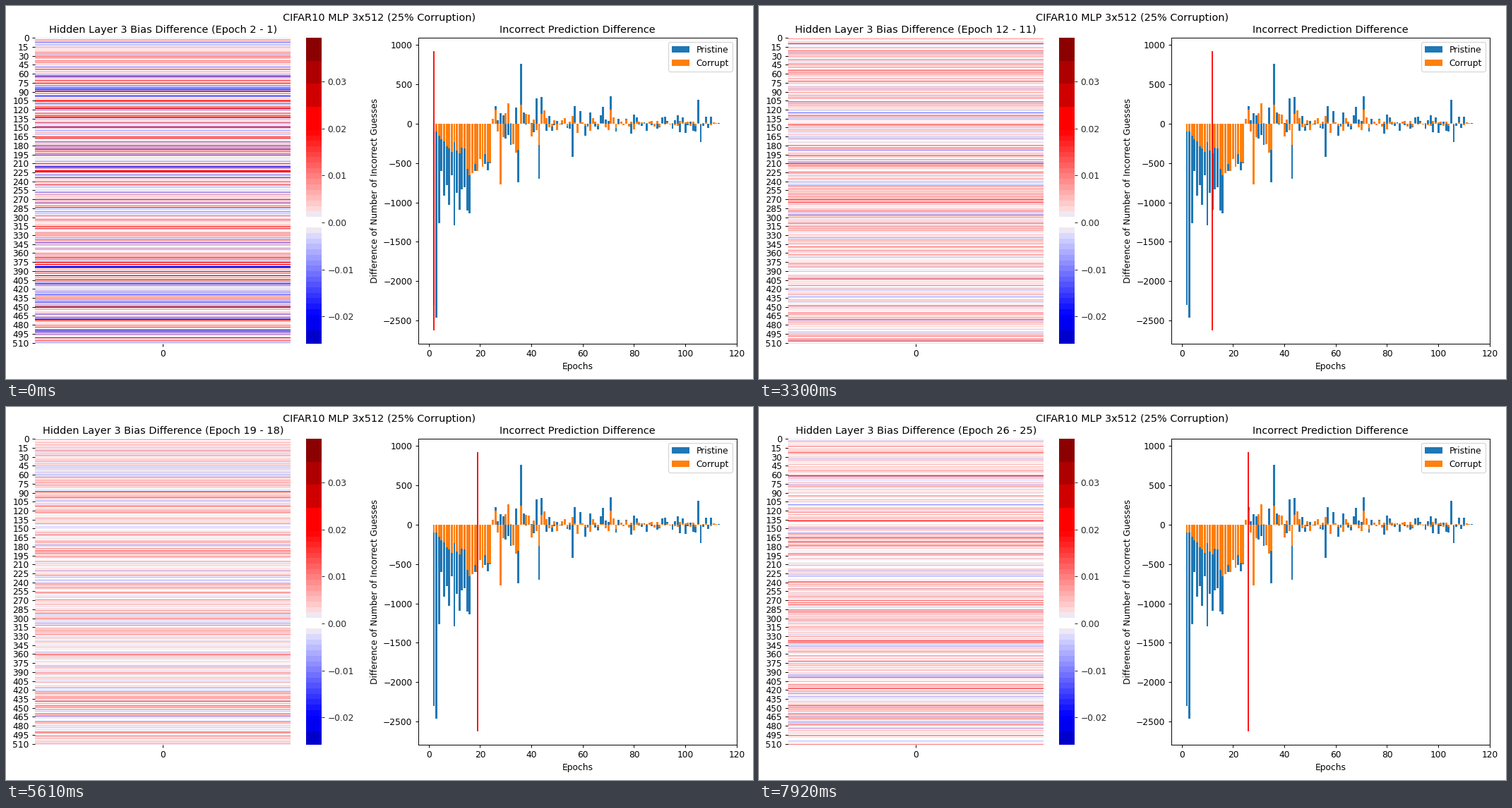
These frames come from a looping animation (1058x529 px, 8000 ms). A matplotlib script:

```python
import numpy as np
import matplotlib.pyplot as plt
from matplotlib.animation import FuncAnimation
from matplotlib.patches import Patch, PathPatch
from matplotlib.path import Path

W, H = 1058, 529
LOOP, STEP, TICK = 8000, 330, 50
ROWS = 512
VMIN, VMAX = -0.0258, 0.0393
HALF = VMAX / 2          # value at which the colour is fully saturated
BLUE, ORANGE = "#1f77b4", "#ff7f0e"
EPOCHS = np.arange(2, 114)

# The tallest bars: epoch -> height
PRISTINE_PEAKS = {2: -2300, 3: -2465, 4: -1260, 10: -1290, 15: -1100,
                  35: -740, 36: 760, 42: 325, 43: -700, 44: 340, 56: -420,
                  57: 225, 68: 215, 71: 350, 105: 305, 106: -230}
CORRUPT_PEAKS = {28: -770, 34: -370, 35: -330, 36: 245, 43: -270, 71: 175}

plt.rcParams.update({"axes.titlesize": 11.85, "figure.titlesize": 11.85})


def bar_heights(seed, base, spread, start, late, peaks):
    """Negative bars before epoch 25, then noise that dies away."""
    rng = np.random.default_rng(seed)
    early = base * rng.uniform(1 - spread, 1 + spread, EPOCHS.size)
    size = late + (start - late) * np.exp(-(EPOCHS - 25) / 25)
    size *= np.clip((114 - EPOCHS) / 5, 0, 1)
    noise = size * rng.normal(0, 1, EPOCHS.size).clip(-1.7, 1.7)
    heights = np.where(EPOCHS < 25, early, noise)
    for epoch, height in peaks.items():
        heights[epoch - EPOCHS[0]] = height
    return heights


def shade(v):
    """Blue-white-red colours in flat bands."""
    v = np.asarray(v, float)
    s = np.abs(v) / HALF
    band = np.floor(s * 17)
    fade = np.where(band < 1, 1, np.clip(1 - (band + .5) / 17, 0, 1))
    reds = np.array([255, 208, 174, 139]) / 255
    blues = np.array([255, 240, 204, 178]) / 255
    red = reds[np.clip(np.floor((s - 1) * 4), 0, 3).astype(int)]
    blue = blues[np.clip(np.floor((s - 1) * 6.9 + .79), 0, 3).astype(int)]
    rgb = np.stack([np.where(v > 0, red, fade), fade,
                    np.where(v > 0, fade, blue)], axis=-1)
    rgb[band == 1] = (.94, .91, .95)
    return rgb


def stripes(epoch):
    """Random bias changes that calm down after the first epochs."""
    rng = np.random.default_rng(epoch)
    spread = .0028 + .003 * np.exp(-(epoch - 2) / 1.5)
    mean = .0022 + .0018 * np.exp(-((epoch - 8) / 3) ** 2)
    v = np.clip(rng.laplace(mean, spread, ROWS), VMIN, VMAX)
    return shade(v)[:, None, :]


def add_axes(x0, x1, y0=44.9, y1=478.9):
    return fig.add_axes([x0 / W, 1 - y1 / H, (x1 - x0) / W, (y1 - y0) / H])


def add_bars(ax, heights, color):
    verts, codes = [], []
    for x, v in zip(EPOCHS, heights):
        a, b = x - .4, x + .4
        verts += [(a, 0), (b, 0), (b, v), (a, v), (a, 0)]
        codes += [Path.MOVETO] + [Path.LINETO] * 3 + [Path.CLOSEPOLY]
    ax.add_patch(PathPatch(Path(verts, codes), fc=color, lw=0))


fig = plt.figure(figsize=(12, 6), dpi=W / 12, facecolor="white")
fig.suptitle("CIFAR10 MLP 3x512 (25% Corruption)", y=.982)

# Heatmap
heat = add_axes(41.3, 403.3)
image = heat.imshow(stripes(2), extent=(0, 1, ROWS, 0), aspect="auto",
                    interpolation="nearest")
heat.set_xticks([.5], ["0"])
heat.set_yticks(np.arange(0, ROWS, 15) + .5, range(0, ROWS, 15))
heat.spines[:].set_visible(False)
title = heat.set_title("")

# Colour scale
scale = add_axes(425, 447)
ramp = shade(np.linspace(VMAX, VMIN, 868))[:, None, :]
scale.imshow(ramp, extent=(0, 1, VMIN, VMAX), aspect="auto",
             interpolation="nearest")
scale.set_xticks([])
scale.set_yticks(np.arange(-2, 4) / 100)
scale.yaxis.tick_right()
scale.tick_params(colors=".15")
scale.spines[:].set_visible(False)

# Bar chart
chart = add_axes(584, 1035)
pristine_base = np.interp(EPOCHS, [16, 17, 24], [-850, -450, -450])
corrupt_base = np.interp(EPOCHS, [2, 12, 18, 24], [-80, -380, -570, -380])
add_bars(chart, bar_heights(4, pristine_base, .35, 190, 60, PRISTINE_PEAKS), BLUE)
add_bars(chart, bar_heights(9, corrupt_base, .3, 200, 20, CORRUPT_PEAKS), ORANGE)
marker, = chart.plot([2, 2], [-2627, 924], color="red", lw=1.5,
                     solid_capstyle="butt")
chart.set_xlim(-4.04, 120.04)
chart.set_ylim(-2795, 1094)
chart.set_title("Incorrect Prediction Difference")
chart.set_xlabel("Epochs")
chart.set_ylabel("Difference of Number of Incorrect Guesses")
chart.legend(handles=[Patch(color=BLUE, lw=0, label="Pristine"),
                      Patch(color=ORANGE, lw=0, label="Corrupt")],
             loc="upper right")


def update(i):
    epoch = 2 + (i * TICK + TICK - 1) // STEP
    image.set_data(stripes(epoch))
    title.set_text(f"Hidden Layer 3 Bias Difference (Epoch {epoch} - {epoch - 1})")
    marker.set_xdata([epoch, epoch])
    return image, title, marker


anim = FuncAnimation(fig, update, frames=LOOP // TICK, interval=TICK,
                     repeat=True, repeat_delay=0, blit=False)
plt.show()
```
